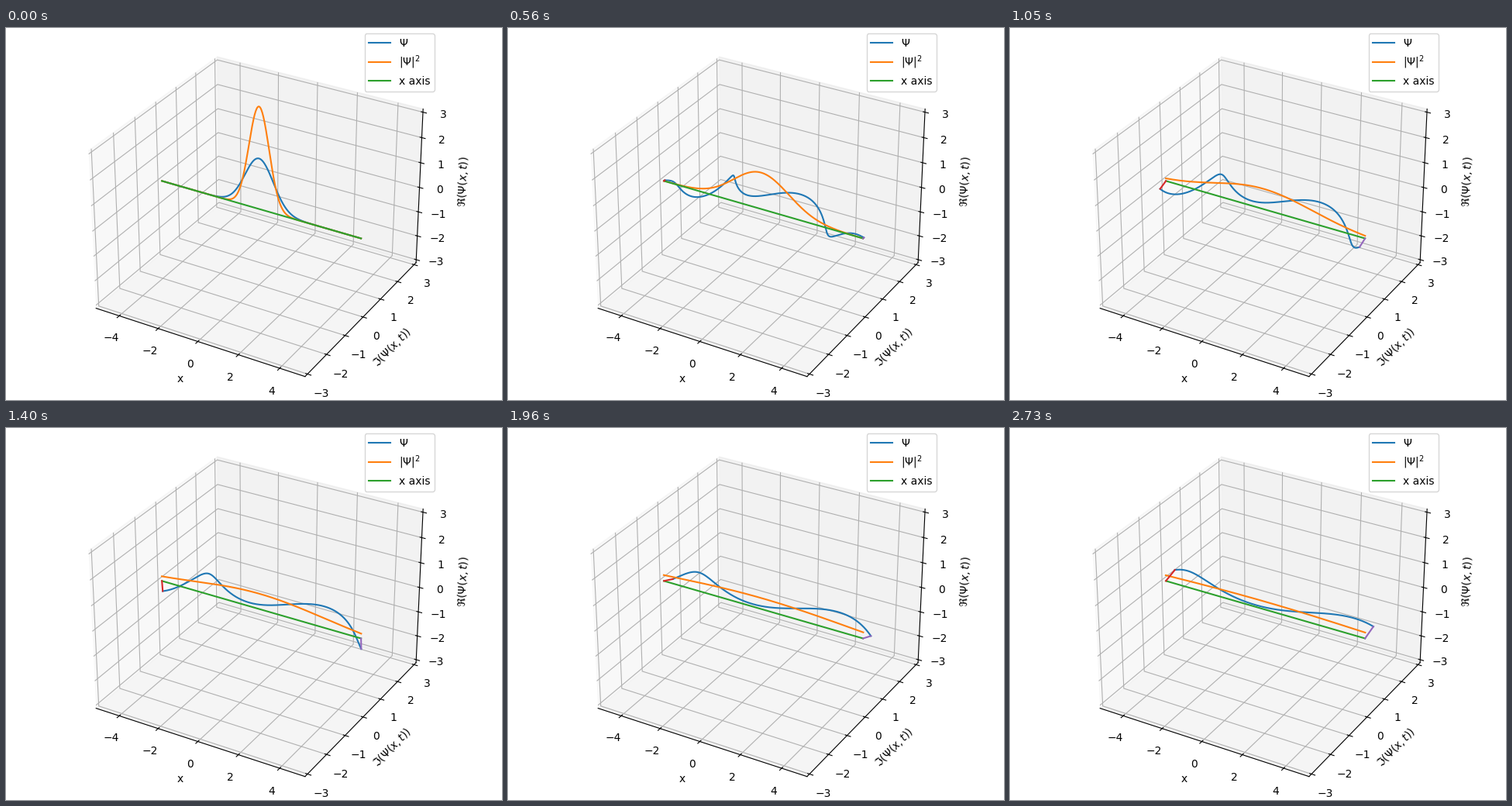
A matplotlib script that plays this animation: 640x480 px, repeating every 2.8 s.

```python
import numpy as np
import matplotlib.pyplot as plt
from matplotlib.animation import FuncAnimation

FRAMES = 40
INTERVAL = 70
SPREAD_STEP = 0.322  # growth of the dimensionless time per frame
HALF_X, HALF_YZ = 5, 3
MARGIN = 25 / 24  # small gap between the data range and the panes

x = np.linspace(-HALF_X, HALF_X, 400)
zeros = np.zeros_like(x)


def psi(s):
    """Freely spreading Gaussian wave packet."""
    width = 1 + 1j * s
    return 2 / np.sqrt(width) * np.exp(-x**2 / width)


fig = plt.figure(figsize=(6.4, 4.8), dpi=100)
ax = fig.add_axes([0, 0, 1, 1], projection="3d")

wave, = ax.plot(x, zeros, zeros, label=r"$\Psi$")
density, = ax.plot(x, zeros, zeros, label=r"$|\Psi|^2$")
ax.plot(x, zeros, zeros, label="x axis")
left, = ax.plot([], [], [])
right, = ax.plot([], [], [])

ax.set_xlim(-HALF_X * MARGIN, HALF_X * MARGIN)
ax.set_ylim(-HALF_YZ * MARGIN, HALF_YZ * MARGIN)
ax.set_zlim(-HALF_YZ * MARGIN, HALF_YZ * MARGIN)
ax.set_xticks(range(-4, 5, 2))
ax.set_yticks(range(-3, 4))
ax.set_zticks(range(-3, 4))
ax.set_xlabel("x")
ax.set_ylabel(r"$\Im(\Psi(x,t))$")
ax.set_zlabel(r"$\Re(\Psi(x,t))$")
ax.legend(loc="upper right")


def update(i):
    p = psi(SPREAD_STEP * i)
    wave.set_data_3d(x, p.imag, p.real)
    density.set_data_3d(x, zeros, np.abs(p) ** 2)
    # Join the ends of the wave to the axis
    for line, k in ((left, 0), (right, -1)):
        line.set_data_3d([x[k], x[k]], [0, p[k].imag], [0, p[k].real])
    return wave, density, left, right


anim = FuncAnimation(fig, update, frames=FRAMES, interval=INTERVAL, repeat=True)
plt.show()
```
